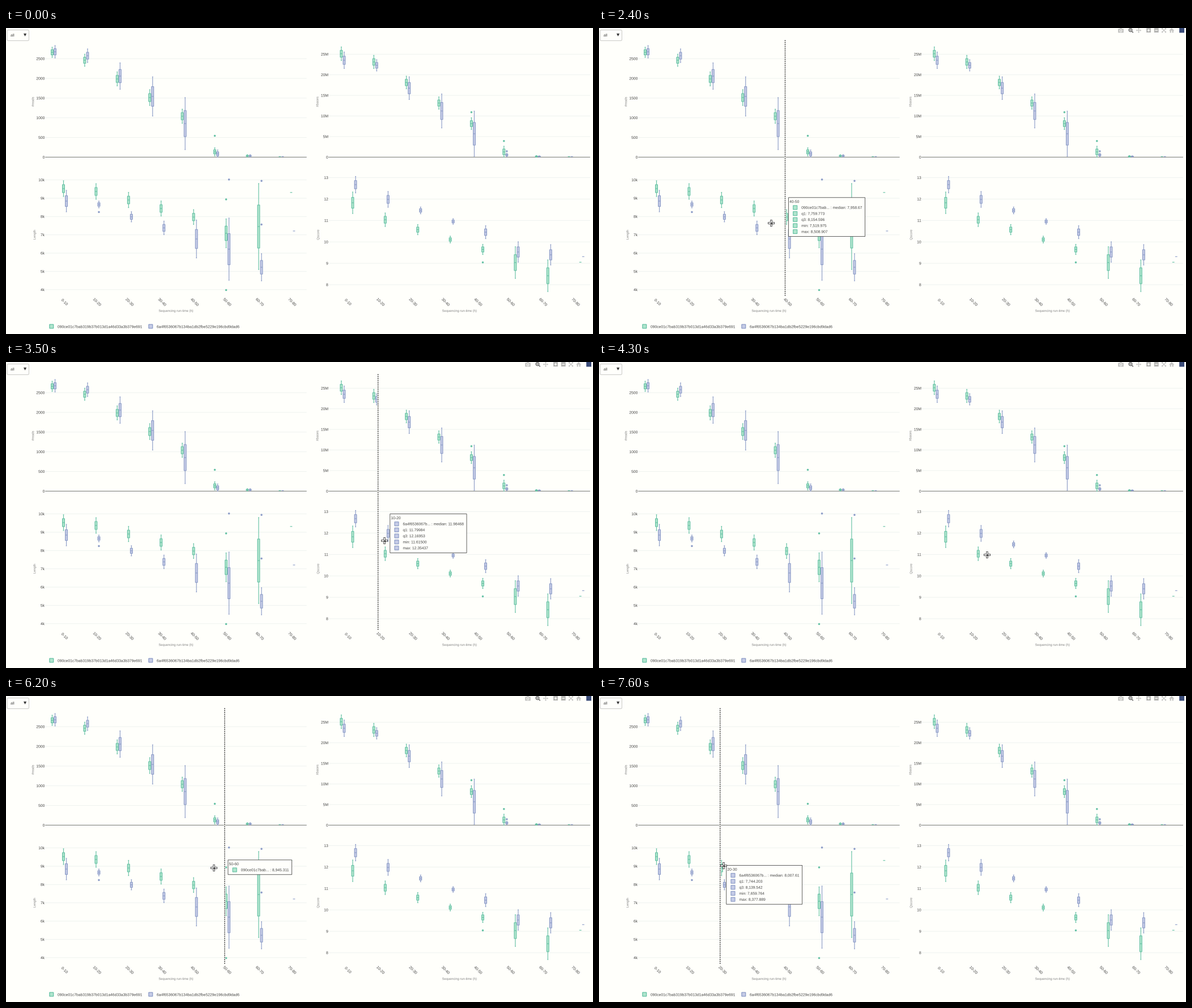
Animation of 1036x541 px, one loop 8 s. Source, as a matplotlib script:

```python
import numpy as np
import matplotlib.pyplot as plt
from matplotlib.animation import FuncAnimation
from matplotlib.collections import LineCollection, PolyCollection
from matplotlib.patches import Circle, FancyBboxPatch, PathPatch, Polygon, Rectangle
from matplotlib.textpath import TextPath
from matplotlib.transforms import Affine2D

W, H, DPI = 1036, 541, 64
PT = 72 / DPI
STEP, LOOP = 100, 8000
BG, INK, DIM, GRID = "#fffffb", "#444444", "#808080", "#edf2ef"
COLORS = ("#66c2a5", "#b0e5cd"), ("#8d9dc8", "#c5cbe6")
RUNS = ("090ce01c7bab319b37b013d1a46d33a3b379e691",
        "6a4f6536067b134ba1db2fbe5229e196cbd9dad6")
BINS = [f"{a}-{a + 10}" for a in range(0, 80, 10)]
LEFT, RIGHT, PITCH, SPAN = 98.9, 599.2, 57.4, 461.5

plt.rcParams["path.snap"] = False
fig = plt.figure(figsize=(W / DPI, H / DPI), dpi=DPI, facecolor=BG)
ax = fig.add_axes([0, 0, 1, 1])
ax.set(xlim=(0, W), ylim=(H, 0))
ax.axis("off")


def line(xs, ys, color, width=1, z=2, **kw):
    return ax.plot(xs, ys, color=color, lw=width * PT, zorder=z,
                   solid_capstyle="butt", **kw)[0]


def rect(x, y, w, h, fill, edge="none", width=1.1, z=2):
    return ax.add_patch(Rectangle((x, y), w, h, fc=fill, ec=edge, lw=width * PT, zorder=z))


def poly(pts, color, z=2):
    return ax.add_patch(Polygon(pts, fc=color, ec="none", zorder=z))


def dot(x, y, r, color, z=3):
    return ax.add_patch(Circle((x, y), r, fc=color, ec="none", zorder=z))


def text(x, y, s, size=6.75, color=INK, ha="left", turn=0, z=2):
    """Text centred on y by digit height; returns its patch and width."""
    path = TextPath((0, 0), s, size=size, prop={"family": "Liberation Sans"})
    box = path.get_extents()
    dx = {"left": 0, "center": -(box.x0 + box.x1) / 2, "right": -box.x1}[ha]
    tr = (Affine2D().translate(dx, -0.35 * size).scale(1, -1)
          .rotate_deg(turn).translate(x, y))
    patch = ax.add_patch(PathPatch(tr.transform_path(path), fc=color, ec="none",
                                   lw=0, zorder=z))
    return patch, box.x1


def box_rows(mid, size):
    """Max, q3, median, q1, min heights per bin from (bin, value) key points."""
    bins = np.arange(7)
    y, h = (np.interp(bins, *zip(*keys)) for keys in (mid, size))
    return y[:, None] + h[:, None] * np.array([-1, -0.5, 0, 0.5, 1])


def trace(x0, rows, color, last, outliers):
    stroke, fill = color
    boxes, segs = [], []
    half, cap = 1.9, 0.9
    for i, (hi, q3, med, q1, lo) in enumerate(rows):
        x = x0 + i * PITCH
        l, r = x - half, x + half
        boxes.append([(l, q3), (r, q3), (r, q1), (l, q1)])
        segs += [[(l, med), (r, med)], [(x, hi), (x, q3)], [(x, q1), (x, lo)],
                 [(x - cap, hi), (x + cap, hi)], [(x - cap, lo), (x + cap, lo)]]
    x = x0 + 7 * PITCH
    segs.append([(x - half, last), (x + half, last)])
    ax.add_collection(PolyCollection(boxes, fc=fill, ec=stroke, lw=1.15 * PT, zorder=3),
                      autolim=False)
    ax.add_collection(LineCollection(segs, colors=stroke, lw=1.15 * PT, zorder=3),
                      autolim=False)
    for i, y in outliers:
        dot(x0 + i * PITCH, y, 1.75, stroke)


class Panel:
    def __init__(self, title, title_x, x0, shift, y0, dy, ticks, unit, suffix, traces):
        self.x0, self.shift, self.y0 = x0, shift, y0
        self.base, self.scale = ticks[0] * unit, (ticks[1] - ticks[0]) * unit / dy
        start, floor = x0 - 29.8, np.inf
        for i, v in enumerate(ticks):
            y = y0 - i * dy
            line([start, start + SPAN], [y, y], GRID, 0.9, 1)
            text(start - 1, y, f"{v}{suffix if v else ''}", ha="right")
        if ticks[0] == 0:
            floor = y0
            line([start, start + SPAN], [y0, y0], "#8a8d8a", 1.2, 1.5)
        text(title_x, 130.5 if y0 < H / 2 else 365.5, title, 5.7, DIM, "center", -90)
        self.rows = []
        for k, (mid, size, last, outliers) in enumerate(traces):
            rows = np.minimum(box_rows(mid, size), floor)
            trace(x0 + shift + 5.05 * k, rows, COLORS[k], last, outliers)
            self.rows.append(rows)

    def value(self, y):
        return self.base + (self.y0 - y) * self.scale


# Each trace: median keys, box height keys, last dash, outliers (all in pixels).
reads = Panel("#reads", 47.3, LEFT, -17.4, 228.4, 34.83, range(0, 3000, 500), 1, "", (
    ([(0, 43), (1, 57), (4, 156), (5, 219), (6, 226)],
     [(0, 9), (3, 14), (4, 12.5), (6, 2)], 227.4, [(5, 190.6)]),
    ([(0, 42), (1, 49), (3, 121), (4, 169), (5, 222.5), (6, 226)],
     [(0, 11), (1, 12), (4, 46), (5, 7), (6, 2)], 227.4, [])))
bases = Panel("#bases", 549.4, RIGHT, -7.4, 228.4, 36.42, range(0, 30, 5), 1e6, "M", (
    ([(0, 45.5), (1, 60), (4, 169), (5, 219), (6, 227)],
     [(0, 12), (5, 10), (6, 1.5)], 227.4, [(4, 148.9), (5, 199.8)]),
    ([(0, 57), (1, 66), (4, 187), (5, 224.5), (6, 227)],
     [(0, 14.5), (1, 10), (4, 40), (5, 3), (6, 1)], 227.4, [(5, 217.9)])))
length = Panel("Length", 50.2, LEFT, 2.6, 462.7, 32.35, range(4, 11), 1000, "k", (
    ([(0, 284), (1, 289), (4, 334.2), (5, 363), (6, 351)],
     [(0, 14), (4, 13), (5, 25.5), (6, 76)], 290.8, [(5, 303), (5, 463.3)]),
    ([(0, 306), (1, 312), (2, 333.8), (4, 373), (5, 391), (6, 423)],
     [(0, 19), (1, 6), (3, 12), (5, 55), (6, 24)], 358.9,
     [(1, 325.4), (5, 267.9), (6, 270.3), (6, 347.4)])))
qscore = Panel("Qscore", 550.6, RIGHT, 12.7, 453.9, 37.87, range(8, 14), 1, "", (
    ([(0, 309), (1, 339), (4, 391.5), (6, 438)],
     [(0, 19), (1, 12), (3, 6), (4, 9), (5, 28)], 414.1, [(4, 414.4)]),
    ([(0, 277), (1, 303), (3, 342), (4, 361), (5, 396), (6, 401)],
     [(0, 14.5), (1, 14), (2, 6), (3, 5), (5, 18)], 404.2, [])))

for x0 in (LEFT, RIGHT):
    for i, name in enumerate(BINS):
        text(x0 + i * PITCH + 4.7, 484.4, name, ha="center", turn=45)
    text(x0 + 201, 499.8, "Sequencing run-time (h)", 5.7, DIM, "center")

for x, run, (stroke, fill) in zip((76.9, 251.9), RUNS, COLORS):
    rect(x, 524.1, 6.8, 6.8, fill, stroke, 1.3)
    text(x + 14.1, 528, run)

# Dropdown
ax.add_patch(FancyBboxPatch((2, 3.5), 38.4, 18.9, boxstyle="round,pad=0,rounding_size=2",
                            fc=BG, ec="#c9c9c7", lw=PT, zorder=2))
text(8, 12.6, "all")
poly([(31, 9.8), (36.2, 9.8), (33.6, 14.8)], "#333333")


def toolbar():
    pale, dark, cy = "#c2c2c0", "#7a7a7a", 4.2
    # camera, magnifier
    parts = [rect(916.2, 1.5, 9.6, 6.8, pale), rect(919, 0.3, 4, 1.5, pale),
             dot(921, 4.9, 2.4, BG), dot(921, 4.9, 1.4, pale),
             ax.add_patch(Circle((938, 3.6), 2.8, fc="none", ec=dark, lw=1.6 * PT, zorder=3)),
             line([940, 942.8], [5.6, 8.2], dark, 1.8),
             line([936.5, 939.5], [3.6, 3.6], dark, 0.9),
             line([938, 938], [2.1, 5.1], dark, 0.9)]
    # pan
    cx = 952.5
    for dx, dy in ((1, 0), (-1, 0), (0, 1), (0, -1)):
        bx, by = cx + 2.6 * dx, cy + 2.6 * dy
        parts += [line([cx, bx], [cy, by], pale, 1.1),
                  poly([(cx + 4.7 * dx, cy + 4.7 * dy), (bx - 1.7 * dy, by + 1.7 * dx),
                        (bx + 1.7 * dy, by - 1.7 * dx)], pale)]
    # zoom in and out
    for cx in (970, 983.7):
        parts += [rect(cx - 3.9, 0.2, 7.8, 7.8, "#b4b4b2"),
                  line([cx - 2.3, cx + 2.3], [4.1, 4.1], BG, 1.3)]
    parts.append(line([970, 970], [1.8, 6.4], BG, 1.3))
    # autoscale
    cx = 997
    for sx in (-1, 1):
        for sy in (-1, 1):
            x, y = cx + 4 * sx, cy + 4 * sy
            parts += [line([cx, cx + 3 * sx], [cy, cy + 3 * sy], pale, 1.1),
                      poly([(x, y), (x - 2.8 * sx, y), (x, y - 2.8 * sy)], pale)]
    # home, badge
    parts += [poly([(1006, 4.6), (1010.7, 0.2), (1015.4, 4.6)], pale),
              rect(1007.6, 4.3, 2.2, 4, pale), rect(1011.6, 4.3, 2.2, 4, pale),
              rect(1024.2, 0, 8.8, 8.4, "#3a4b78")]
    return parts


def stats(panel, run, bin_no, digits):
    hi, q3, med, q1, lo = (f"{panel.value(y):,.{digits}f}" for y in panel.rows[run][bin_no])
    return med, q1, q3, lo, hi


def tip(panel, run, bin_no, values, y=None):
    """Dotted spike and hover box for a box, or for one point at y."""
    labels = ("median: ", "q1: ", "q3: ", "min: ", "max: ") if y is None else ("",)
    y = panel.rows[run][bin_no][2] if y is None else y
    cx = panel.x0 + bin_no * PITCH
    x = cx + panel.shift + 5.05 * run + 3.4
    height = 15.2 + 10.72 * len(labels)
    top = y - height / 2
    stroke, fill = COLORS[run]
    parts = [line([cx, cx], [21.5, 474], BG, 2.8, 5),
             line([cx, cx], [21.5, 474], "#222222", 1.5, 5.1, dashes=(1.12, 1.12),
                  dash_capstyle="butt")]
    frame = rect(x, top, 1, height, BG, INK, 0.85, 6)
    parts += [frame, text(x + 1.6, top + 7, BINS[bin_no], z=7)[0]]
    width = 0
    for i, (label, value) in enumerate(zip(labels, values)):
        cy = top + 17.6 + 10.65 * i
        head = "" if i else f"{RUNS[run][:12]}... : "
        patch, w = text(x + 22.7, cy, head + label + value, 6.72, z=7)
        parts += [rect(x + 8.2, cy - 3.5, 7, 7, fill, stroke, 1.2, 7), patch]
        width = max(width, w)
    frame.set_width(width + 28.1)
    return parts


blue_20 = tip(length, 1, 2, ("8,007.61", "7,744.203", "8,139.542", "7,659.764", "8,377.889"))
green_40 = tip(length, 0, 4, ("7,958.67", "7,759.773", "8,154.596", "7,519.975", "8,508.907"))
HOVERS = [(1800, 2000, tip(length, 0, 2, stats(length, 0, 2, 3))),
          (2000, 2200, blue_20),
          (2400, 2600, green_40),
          (3300, 4100, tip(qscore, 1, 1, stats(qscore, 1, 1, 5))),
          (5100, 5900, tip(qscore, 0, 2, stats(qscore, 0, 2, 5))),
          (6200, 6300, tip(length, 0, 5, ("8,945.311",), 302.8)),
          (7400, LOOP, blue_20)]

# Pointer key poses: time, x, y.
TRACK = np.array([
    (500, 75, 34), (800, 75, 29), (1000, 75, 29), (1600, 196, 198), (1800, 212, 265),
    (2200, 223, 340), (2400, 303, 344), (2600, 482, 346), (3000, 647, 345),
    (3600, 672, 309), (4000, 672, 309), (4300, 684, 340), (4800, 725, 357),
    (5800, 725, 357), (6200, 366, 303), (6700, 214, 301), (7200, 214, 301),
    (7600, 219, 299)]).T

bar = toolbar()
pointer = [ax.plot([0], [0], "+", ms=size * PT, mew=w * PT, color=c, zorder=9 + i)[0]
           for i, (size, w, c) in enumerate(((12, 3.6, "#4a4a4a"), (10, 1.8, "#ffffff"),
                                             (3.4, 1.2, "#333333")))]


def draw(n):
    t = n * STEP
    fade = float(np.clip((t - 300) / 500, 0, 1))
    for part in bar:
        part.set_alpha(fade)
    active = [parts for a, b, parts in HOVERS if a <= t < b]
    for *_, parts in HOVERS:
        for part in parts:
            part.set_visible(parts in active)
    # The quick sweep updates only every second step.
    when = t - t % 200 if 1600 <= t < 2800 else t
    x, y = (np.interp(when, TRACK[0], row) for row in TRACK[1:])
    for mark in pointer:
        mark.set_data([x + 0.5], [y + 0.5])
        mark.set_visible(t >= TRACK[0, 0])
    return []


anim = FuncAnimation(fig, draw, frames=LOOP // STEP, interval=STEP,
                     repeat=True, repeat_delay=0, blit=False)
plt.show()
```
